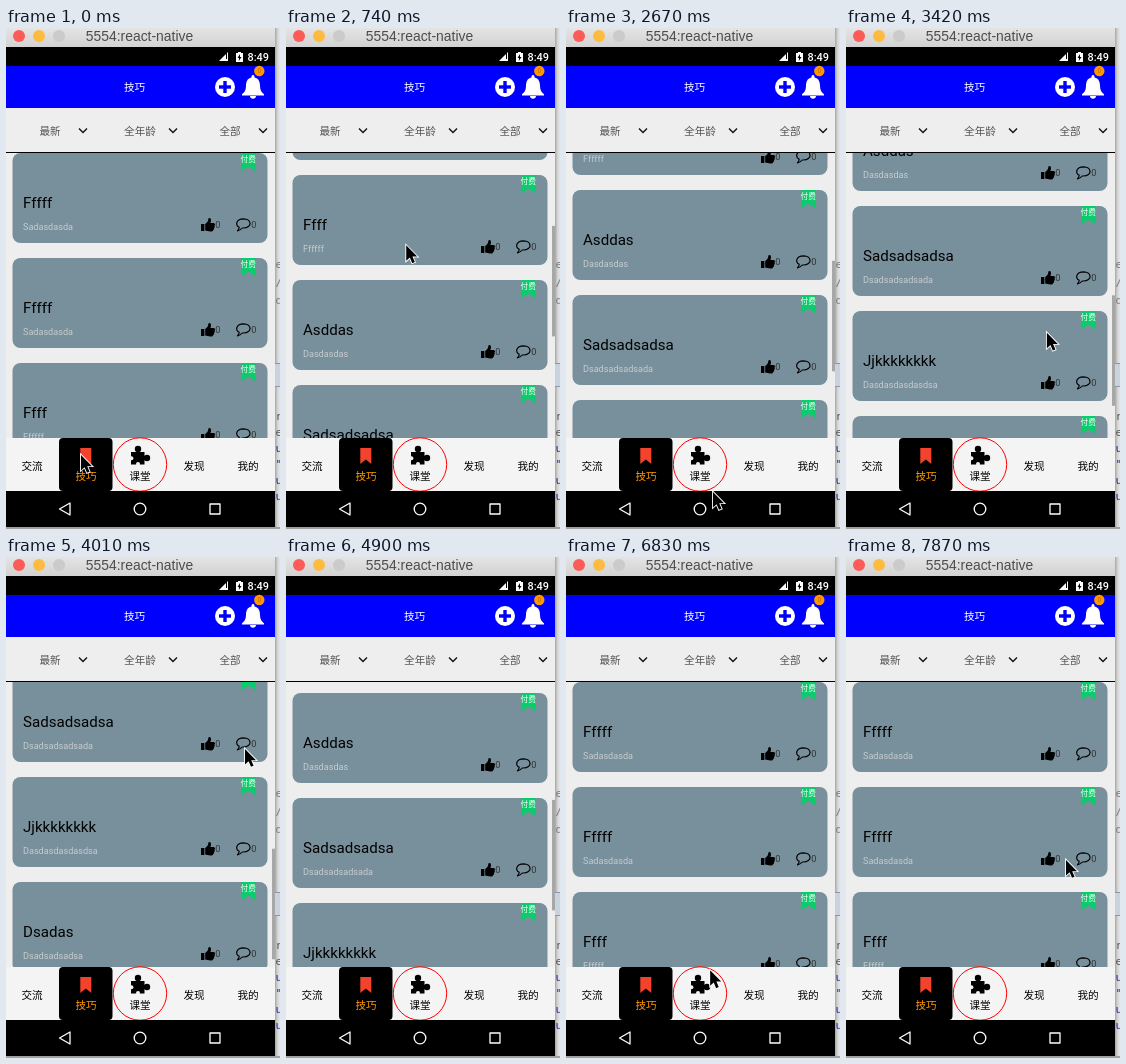
Animation of 274 by 501 pixels, one loop 8 s. Source, as an HTML page with a canvas:

```html
<!DOCTYPE html>
<html lang="zh">
<head>
<meta charset="utf-8">
<title>Card list</title>
<style>
html, body { margin: 0; width: 100%; height: 100%; overflow: hidden; background: #eee; }
canvas { display: block; width: 274px; height: 501px; }
</style>
</head>
<body>
<canvas id="stage"></canvas>
<script>
const W = 274, H = 501, LOOP = 8000, STEP = 148.55;
const LIST_TOP = 125, VIEW = 285, PITCH = 105, CARD_H = 90;
const LIST_BOTTOM = LIST_TOP + VIEW;
const CJK = '"Noto Sans CJK SC", "Noto Sans CJK", "Noto Sans CJK JP", sans-serif';
const ROBOTO = 'Roboto, sans-serif';
const canvas = document.getElementById('stage');
const ctx = canvas.getContext('2d');
const dpr = window.devicePixelRatio || 1;
canvas.width = W * dpr;
canvas.height = H * dpr;

const cards = [
  ['Fffff', 'Sadasdasda'],
  ['Fffff', 'Sadasdasda'],
  ['Ffff', 'Ffffff'],
  ['Asddas', 'Dasdasdas'],
  ['Sadsadsadsa', 'Dsadsadsadsada'],
  ['Jjkkkkkkkk', 'Dasdasdasdasdsa'],
  ['Dsadas', 'Dsadsadsadsa']
];
const maxScroll = cards.length * PITCH - VIEW;

// Turning points of the drag: time in ms, then values
const scrollPath = [[150, 0], [1480, maxScroll], [2670, 278], [4010, 430], [4900, 304], [6090, 0]];
const cursorPath = [[0, 75, 427], [1480, 165, 10], [2670, 147, 464], [4010, 239, 192],
  [4900, 220, 505], [5700, 210, 190], [6240, 216, 243], [7130, 119, 473], [7580, 226, 174], [7870, 220, 303]];

const clamp = p => Math.min(1, Math.max(0, p));
const smooth = p => p * p * (3 - 2 * p);

function along(path, t) {
  const next = path.findIndex(k => k[0] > t);
  if (next === 0) return path[0].slice(1);
  if (next < 0) return path[path.length - 1].slice(1);
  const a = path[next - 1], b = path[next];
  const p = smooth((t - a[0]) / (b[0] - a[0]));
  return a.slice(1).map((v, i) => v + (b[i + 1] - v) * p);
}

// Rises from 0 to 1 before "on", falls back after "off"
const pulse = (t, on, off, fade) => Math.min(clamp((t - on) / fade + 1), clamp((off - t) / fade + 1));

function rect(x, y, w, h, color) {
  ctx.fillStyle = color;
  ctx.fillRect(x, y, w, h);
}

function gradient(x, y, stops) {
  const g = ctx.createLinearGradient(...x, ...y);
  stops.forEach((c, i) => g.addColorStop(i / (stops.length - 1), c));
  return g;
}

function text(str, x, y, size, color, font = ROBOTO, align = 'left', weight = 400) {
  ctx.font = `${weight} ${size}px ${font}`;
  ctx.fillStyle = color;
  ctx.textAlign = align;
  ctx.fillText(str, x, y);
}

const label = (str, x, y, color, size = 10.6) => text(str, x, y + size * 0.37, size, color, CJK, 'center');

function disc(x, y, r, color) {
  ctx.beginPath();
  ctx.arc(x, y, r, 0, Math.PI * 2);
  ctx.fillStyle = color;
  ctx.fill();
}

function ring(x, y, r, color, width) {
  ctx.beginPath();
  ctx.arc(x, y, r, 0, Math.PI * 2);
  ctx.strokeStyle = color;
  ctx.lineWidth = width;
  ctx.stroke();
}

function round(x, y, w, h, r, color) {
  ctx.beginPath();
  ctx.roundRect(x, y, w, h, r);
  ctx.fillStyle = color;
  ctx.fill();
}

function shape(path, x, y, fill, line, width) {
  const p = new Path2D(path);
  ctx.save();
  ctx.translate(x, y);
  if (line) {
    ctx.strokeStyle = line;
    ctx.lineWidth = width;
    ctx.stroke(p);
  }
  if (fill) {
    ctx.fillStyle = fill;
    ctx.fill(p);
  }
  ctx.restore();
}

const ribbon = (x, y, w, h, notch, color) =>
  shape(`M0 0 H${w} V${h} L${w / 2} ${h - notch} L0 ${h}Z`, x, y, color);

function backdrop() {
  rect(0, 0, W, H, '#eeeeee');
  rect(269, 0, 5, H, gradient([269, 0], [274, 0], ['#a6a6a6', '#d2d2d2', '#e6e6e6']));
  rect(269, 336, 5, 22, '#c9d3e0');
  rect(269, 335, 5, 1, '#8d97a3');
  rect(269, 358, 5, 1, '#8d97a3');
  const mono = '"DejaVu Sans Mono", monospace';
  [...'e/d'].forEach((s, i) => text(s, 269.5, 240 + i * 18, 11, '#777', mono));
  [...'reu"uu'].forEach((s, i) => text(s, 269.5, 392 + i * 16, 11, i < 2 ? '#555' : '#1c1c90', mono));
}

function titleBar() {
  rect(0, 0, 269, 19, gradient([0, 0], [0, 19], ['#e4e4e4', '#d2d2d2']));
  ['#fc5b57', '#fdbc40', '#cbcbcb'].forEach((c, i) => disc(13 + i * 20, 8, 6, c));
  text('5554:react-native', 133.5, 13, 13.9, '#4c4c4c', '"Liberation Sans", sans-serif', 'center');
}

function header() {
  rect(0, 19, 269, 19, '#000');
  shape('M0 9 L9 0 V9Z', 213, 24, '#fff');
  rect(220, 24, 1, 7, '#000');
  shape('M0 1 H2 V0 H5 V1 H7 V10 H0Z', 230, 24, '#fff');
  shape('M2.5 0 L0 4 H1.5 L1.3 7 L4 3 H2.5Z', 231.5, 26, '#000');
  text('8:49', 263, 33, 10.9, '#fff', ROBOTO, 'right', 500);

  rect(0, 38, 269, 42, '#0000ff');
  label('技巧', 128.5, 59, '#fff');
  disc(219, 59, 10, '#fff');
  rect(213, 57.3, 12, 3.4, '#0000ff');
  rect(217.3, 53, 3.4, 12, '#0000ff');
  shape('M0-12 C1.5-12 1.5-10 1.5-9.6 C6-8.6 7-5 7-1 C7 3 8.5 5.5 11 7.3 V8.5 H-11 V7.3 C-8.5 5.5-7 3-7-1 C-7-5-6-8.6-1.5-9.6 C-1.5-10-1.5-12 0-12Z M-3 9 H3 C3 12.6-3 12.6-3 9Z', 247, 59, '#fff');
  disc(253.3, 43, 5.2, '#ff9800');
  text('0', 253.3, 45.4, 6.5, '#c76a00', ROBOTO, 'center');

  rect(0, 80, 269, 44, '#eeeeee');
  ['最新', '全年龄', '全部'].forEach((s, i) => {
    label(s, 44 + i * 90, 103, '#555');
    shape('M-4 0 L0 4 L4 0', 77 + i * 90, 100.5, null, '#111', 1.4);
  });
  rect(0, 124, 269, 1, '#000');
}

function card([title, sub], y, alpha) {
  ctx.save();
  ctx.globalAlpha = alpha;
  ctx.lineJoin = 'round';
  round(6.5, y, 255, CARD_H, 8, '#78909c');
  ribbon(235, y, 15, 18.5, 5, '#0ccb6c');
  label('付费', 242.3, y + 6.5, '#fff', 7.7);
  text(title, 17, y + 55, 15.1, '#000');
  text(sub, 17, y + 76.5, 9.1, '#c6cbcd');
  shape('M0 6 H3.4 V13 H0Z M4.2 6 C6 5 7 3.5 7.2 1.8 C7.3 0 8 0 8.5 0 C10.8 .6 10 3.4 9.4 5 H12.5 C14.5 5.3 14.4 7 13.4 7.6 C14.2 8.5 13.8 9.6 13 9.9 C13.5 10.9 12.9 11.7 12.2 12 C12.2 13.4 11 13.6 9.5 13.6 C7.2 13.6 6 12.6 4.2 12.6Z', 195, y + 65, '#000');
  shape('M3.2 9.3 C-1 7 0 .9 7.5 .8 C16.2 .9 16.2 10 7.5 10 H6.2 C4.8 11.8 3.4 12.5 1.5 12.8 C2.7 11.8 3.1 10.7 3.2 9.3Z', 230, y + 65, null, '#000', 1.2);
  [209.3, 245.3].forEach(x => text('0', x, y + 75, 9.2, '#333'));
  ctx.restore();
}

function list(t) {
  const scroll = Math.round(along(scrollPath, t)[0]);
  const bar = pulse(t, 300, 6090, 300);
  const glow = pulse(t, 1480, 1630, 300);
  ctx.save();
  ctx.beginPath();
  ctx.rect(0, LIST_TOP, 269, VIEW);
  ctx.clip();
  rect(0, LIST_TOP, 269, VIEW, '#eeeeee');
  cards.forEach((c, i) => card(c, LIST_TOP + i * PITCH - scroll, i === 5 ? 1 - 0.2 * glow : 1));
  disc(134, LIST_BOTTOM - 46 * glow + 500, 500, `rgba(238,238,238,${0.3 * glow})`);
  const k = VIEW / (VIEW + maxScroll);
  rect(266, LIST_TOP + scroll * k, 3, VIEW * k, `rgba(120,120,120,${0.6 * bar})`);
  ctx.restore();
}

function puzzle(x, y, hole) {
  rect(x - 9, y - 3, 13.5, 12.5, '#000');
  disc(x - 2, y - 6, 3.2, '#000');
  rect(x - 3.5, y - 5, 3, 4, '#000');
  disc(x + 7, y + 3, 3.2, '#000');
  rect(x + 4, y + 1.5, 3, 3, '#000');
  disc(x - 8.6, y + 3.2, 2, hole);
  disc(x - 2, y + 9, 2, hole);
}

function tabs() {
  rect(0, 410, 269, 53, '#f4f4f4');
  round(53, 410, 53.5, 53, 4, '#000');
  ribbon(74.3, 420, 11, 16, 4.5, '#f4432c');
  ring(134, 436.5, 26.7, '#f00', 1);
  puzzle(134, 427, '#f4f4f4');
  ['交流', '技巧', '课堂', '发现', '我的'].forEach((s, i) => {
    const stacked = i === 1 || i === 2;
    label(s, 26 + i * 54, stacked ? 448 : 438, i === 1 ? '#ff9800' : '#000');
  });
}

function navBar() {
  rect(0, 463, 269, 36, '#000');
  ctx.lineJoin = 'round';
  shape('M0 6 L10.5 0 V12Z', 53.5, 475, null, '#fff', 1.3);
  ring(134, 481, 5.8, '#fff', 1.3);
  shape('M0 0 H10 V10 H0Z', 204, 476, null, '#fff', 1.3);
  rect(0, 499, W, 2, '#a0a0a0');
}

function cursor(t) {
  const [x, y] = along(cursorPath, t);
  ctx.lineJoin = 'miter';
  shape('M0 0 V15.5 L3.6 12.2 L6 17.8 L8.6 16.7 L6.2 11.2 H11Z', x, y, '#000', '#fff', 1.8);
}

function draw(t) {
  ctx.setTransform(dpr, 0, 0, dpr, 0, 0);
  backdrop();
  titleBar();
  list(t);
  header();
  tabs();
  navBar();
  cursor(t);
}

const start = performance.now();
function tick() {
  const t = (performance.now() - start) % LOOP;
  // The picture advances in even steps, a little ahead of the clock
  draw(Math.floor((t + 6) / STEP) * STEP);
  requestAnimationFrame(tick);
}
tick();
</script>
</body>
</html>
```
